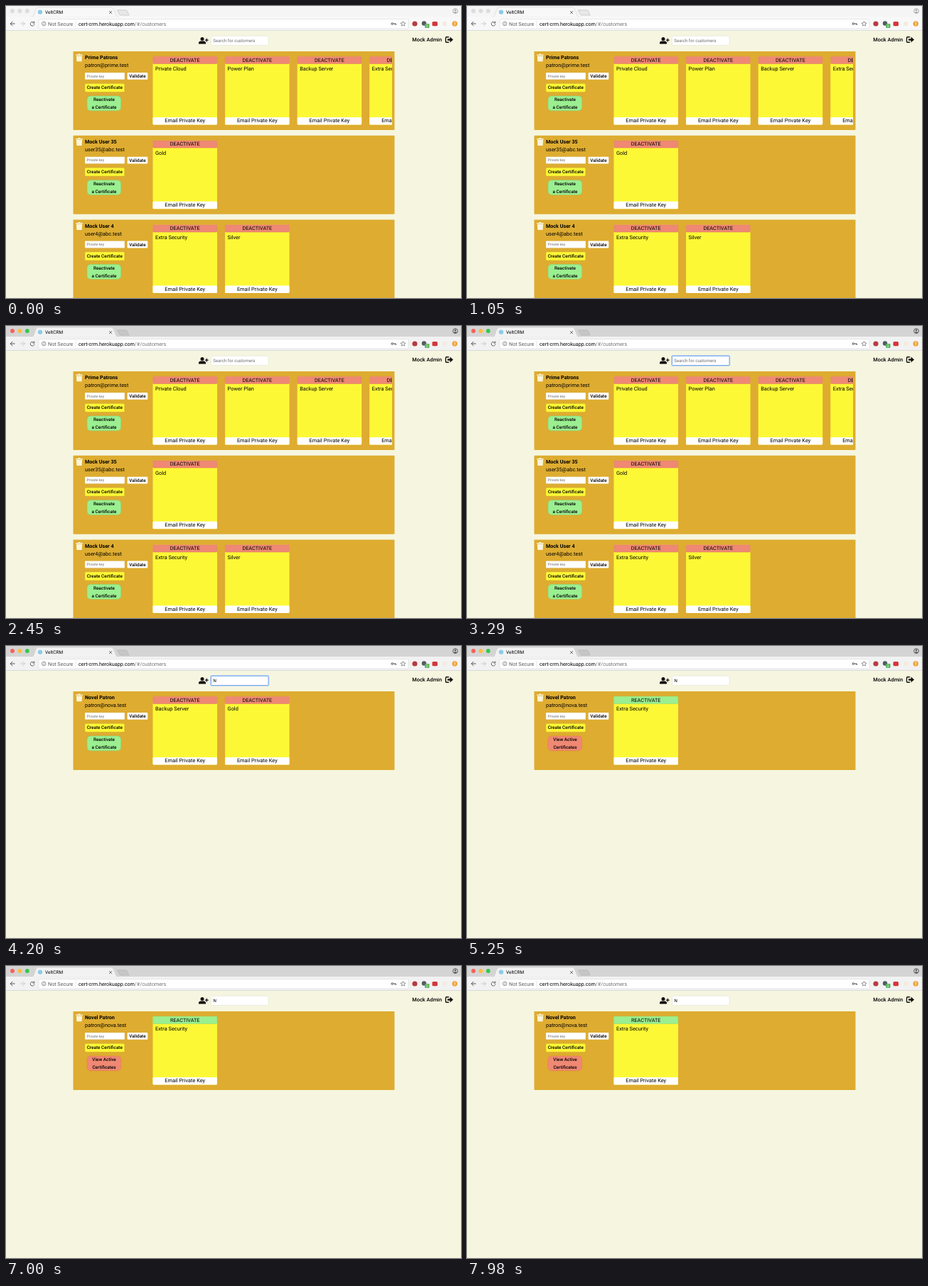
Recreate the animation shown at these times as an HTML page. Size 640 by 412 pixels, loop 8 s.

```html
<!DOCTYPE html>
<html lang="en">
<head>
<meta charset="utf-8">
<title>Customers</title>
<style>
html, body { margin: 0; width: 100%; height: 100%; overflow: hidden; background: #f6f6e0; }
svg { display: block; width: 640px; height: 412px; }
text { font-family: Roboto, sans-serif; font-size: 7.4px; fill: #000; white-space: pre; text-rendering: geometricPrecision; }
.mid { text-anchor: middle; }
.bold { font-weight: 500; }
.name { font-weight: 700; font-size: 7.2px; }
.action { font-size: 7.3px; }
.button { font-size: 6.4px; font-weight: 500; }
.key { font-size: 5.1px; fill: #6c6c6c; }
.input { font-size: 6.2px; }
.hint { fill: #6c6c6c; }
.tab { font-size: 6.5px; }
.url { font-size: 7.2px; }
.grey { fill: #5a5a5a; }
.white { fill: #fff; }
.line { fill: none; stroke-linecap: round; stroke-linejoin: round; }

.idle, .awake, .all, .found, .inactive, .typed, .focus { animation: 8s step-end infinite; }
.idle { animation-name: idle; }
.awake { animation-name: awake; }
.all { animation-name: all; }
.found { animation-name: found; }
.inactive { animation-name: inactive; }
.typed { animation-name: typed; }
.focus { animation-name: focus; }
@keyframes idle { 0% { opacity: 1 } 17.5%, 100% { opacity: 0 } }
@keyframes awake { 0% { opacity: 0 } 17.5%, 100% { opacity: 1 } }
@keyframes all { 0% { opacity: 1 } 42%, 100% { opacity: 0 } }
@keyframes typed { 0% { opacity: 0 } 42%, 100% { opacity: 1 } }
@keyframes found { 0% { opacity: 0 } 42% { opacity: 1 } 63.875%, 100% { opacity: 0 } }
@keyframes inactive { 0% { opacity: 0 } 63.875%, 100% { opacity: 1 } }
@keyframes focus { 0% { opacity: 0 } 35% { opacity: 1 } 63.875%, 100% { opacity: 0 } }
</style>
</head>
<body>
<svg id="stage" viewBox="0 0 640 412"></svg>
<script>
const YELLOW = '#fdf836', SALMON = '#ef8874', GREEN = '#9bef90';

const rect = (x, y, w, h, fill, r = 0, extra = '') =>
  `<rect x="${x}" y="${y}" width="${w}" height="${h}" rx="${r}" fill="${fill}" ${extra}/>`;
const circle = (x, y, r, fill, extra = '') => `<circle cx="${x}" cy="${y}" r="${r}" fill="${fill}" ${extra}/>`;
const path = (d, fill, extra = '') => `<path d="${d}" fill="${fill}" ${extra}/>`;
const line = (d, width = 1, color = '#555') =>
  `<path class="line" d="${d}" stroke="${color}" stroke-width="${width}"/>`;
const text = (x, y, words, style = '') => `<text x="${x}" y="${y}" class="${style}">${words}</text>`;
const group = (style, ...parts) => `<g class="${style}">${parts.join('')}</g>`;
const border = (color, width = .5) => `stroke="${color}" stroke-width="${width}"`;

function titleBar(style, bar, tab, newTab, lights, ink) {
  return group(style,
    rect(0, 0, 640, 16, bar),
    rect(0, 15, 640, 20, tab),
    path('M35 15.5C39 15 39 13 41 7Q42.5 2 45 2H148Q151 2 152.5 7C155 14 155 15 159 15.5Z', tab, border('#bbb', .4)),
    rect(34, 15.2, 126, 1, tab),
    path('M156.5 5.8H168.5Q170 5.8 170.7 7.5L173 13H161.5Q160 13 159 11Z', newTab, border('#adadad')),
    ...lights.map((color, i) => circle(9 + i * 10.4, 7, 2.9, color)),
    circle(632, 7, 3.4, 'none', border(ink, 1)),
    circle(632, 6, 1.3, ink),
    path('M629.6 9.2Q632 6.6 634.4 9.2L632 10.5Z', ink));
}

function toolbar() {
  return [
    circle(48, 8.6, 3.2, '#8ccbe6'),
    text(55, 11.2, 'VeltCRM', 'tab'),
    line('M145.3 7.2l3.6 3.6m0 -3.6l-3.6 3.6', .8),
    line('M12.2 25H6.2M9 22.2L6.2 25L9 27.8'),
    line('M20.5 25H26.5M23.7 22.2L26.5 25L23.7 27.8', 1, '#c9c9c9'),
    line('M39.4 23.4A2.9 2.9 0 1 0 40 25.7M39.8 22V24H37.8', 1, '#666'),
    rect(46, 18.5, 520, 13.4, '#fff', 1.5, border('#d0d0d0')),
    circle(53.2, 25, 2.8, 'none', border('#666', .7)),
    rect(52.8, 24.6, .8, 2, '#666'), rect(52.8, 23.2, .8, .8, '#666'),
    text(59, 27.6, 'Not Secure', 'url grey'),
    rect(97.7, 20.5, .5, 9, '#d0d0d0'),
    text(102, 27.6, 'cert-crm.herokuapp.com<tspan fill="#707070">/#/customers</tspan>', 'url'),
    circle(543.3, 25, 1.3, 'none', border('#555', 1)),
    line('M545 25H548.5V26.5M547 25V26', .9),
    path('M558.5 21.6l1 2.3 2.5.2-1.9 1.6.6 2.4-2.2-1.3-2.2 1.3.6-2.4-1.9-1.6 2.5-.2z', 'none', border('#666', .7)),
    circle(575, 25, 3.6, '#b83b3f'),
    circle(588, 24.5, 3.2, '#555b62'),
    rect(589.2, 25, 6.3, 6, '#55b55b', 1),
    text(590.8, 30, '2', 'key white'),
    rect(599.5, 22, 7.5, 6.2, '#d43738', 1.5),
    circle(617, 25, 3.1, '#f3eadf'),
    circle(631.2, 25, 3.8, '#efa63d'),
    rect(630.8, 22.7, .9, 2.8, '#fff'), rect(630.8, 26.3, .9, .9, '#fff'),
    rect(0, 34, 640, .6, '#c9c9c9')
  ].join('');
}

function searchBox() {
  const box = (r, extra) => rect(288.5, 42.3, 80.5, 13.2, '#fff', r, extra);
  return box(.5, border('#deded0')) +
    group('focus', box(1.2, border('#b4d0f3', 2.6)), box(.8, border('#78aaea', 1))) +
    group('all', text(291.3, 51.1, 'Search for customers', 'input hint')) +
    group('typed', text(291.5, 51.1, 'N', 'input'));
}

function header() {
  const addUser = circle(276, 46.4, 2.5, '#111') +
    path('M271 53.5V52Q271 49.5 274 49.5H278Q281 49.5 281 52V53.5Z', '#111') +
    line('M280.3 48.1H284.3M282.3 46.1V50.1', 1.2, '#111');
  const signOut = line('M622.5 43.8H619.5Q618.5 43.8 618.5 44.8V50.2Q618.5 51.2 619.5 51.2H622.5', 1.4, '#111') +
    path('M621 46.3H624.5V43.6L629 47.5L624.5 51.4V48.7H621Z', '#111');
  return addUser + searchBox() + text(571.3, 50.3, 'Mock Admin', 'bold') + signOut;
}

function certificate(label, i, active) {
  const x = 206.5 + i * 101.6, center = x + 45.2;
  return rect(x, 7, 90.5, 96.5, YELLOW, 1.5) +
    rect(x + .2, 7.2, 90.1, 10.2, active ? SALMON : GREEN, 1, border(active ? '#d9755f' : '#7fd478')) +
    rect(x, 93, 90.5, 10.5, '#fff', 1.5) +
    text(center, 14.5, active ? 'DEACTIVATE' : 'REACTIVATE', 'mid action') +
    text(x + 3.5, 27.4, label) +
    text(center, 100.2, 'Email Private Key', 'mid');
}

function customer(y, name, email, labels, active = true) {
  const [first, second] = active ? ['Reactivate', 'a Certificate'] : ['View Active', 'Certificates'];
  const trash = path('M98.2 4.4H101.1L101.9 3.4H104.1L104.9 4.4H107.8V5.8H98.2ZM98.9 6.4H107.1L106.6 14.3H99.4Z', '#f8f5dc');
  return `<g transform="translate(0 ${y})">` +
    rect(94.5, 0, 452, 111, '#deac30', .8) + trash +
    text(111, 11.1, name, 'name') + text(111, 22, email) +
    rect(111, 30, 56, 9.8, '#fff', .4, border('#d2ba75', .4)) +
    text(113.5, 36.6, 'Private key', 'key') +
    rect(170.6, 30, 28.7, 9.8, '#fff', 1) + text(185, 37, 'Validate', 'mid button') +
    rect(111, 45.5, 55.7, 11.8, YELLOW, 1.5, border('#cbb62d', .4)) +
    text(138.8, 53.4, 'Create Certificate', 'mid button') +
    rect(114, 63, 47.8, 20.8, active ? GREEN : SALMON, 5, border(active ? '#83cd70' : '#e57a3f')) +
    text(138, 70.4, first, 'mid button') + text(138, 81, second, 'mid button') +
    `<g clip-path="url(#shelf)">${labels.map((label, i) => certificate(label, i, active)).join('')}</g></g>`;
}

const match = ['Novel Patron', 'patron@nova.test'];
document.getElementById('stage').innerHTML =
  '<defs><clipPath id="shelf"><rect x="200" y="0" width="343" height="111"/></clipPath></defs>' +
  rect(0, 0, 640, 412, '#f6f6e0') +
  titleBar('idle', '#f5f5f5', '#f8f8f8', '#e8e8e8', Array(3).fill('#dcdcdc'), '#aaa') +
  titleBar('awake', '#d5d4d5', '#f2f2f2', '#c6c6c6', ['#fb5f57', '#fcbc3f', '#35c84a'], '#5c5c5c') +
  toolbar() + header() +
  group('all',
    customer(64, 'Prime Patrons', 'patron@prime.test', ['Private Cloud', 'Power Plan', 'Backup Server', 'Extra Security']),
    customer(182.7, 'Mock User 35', 'user35@abc.test', ['Gold']),
    customer(301.6, 'Mock User 4', 'user4@abc.test', ['Extra Security', 'Silver'])) +
  group('found', customer(64, ...match, ['Backup Server', 'Gold'])) +
  group('inactive', customer(64, ...match, ['Extra Security'], false));
</script>
</body>
</html>
```
